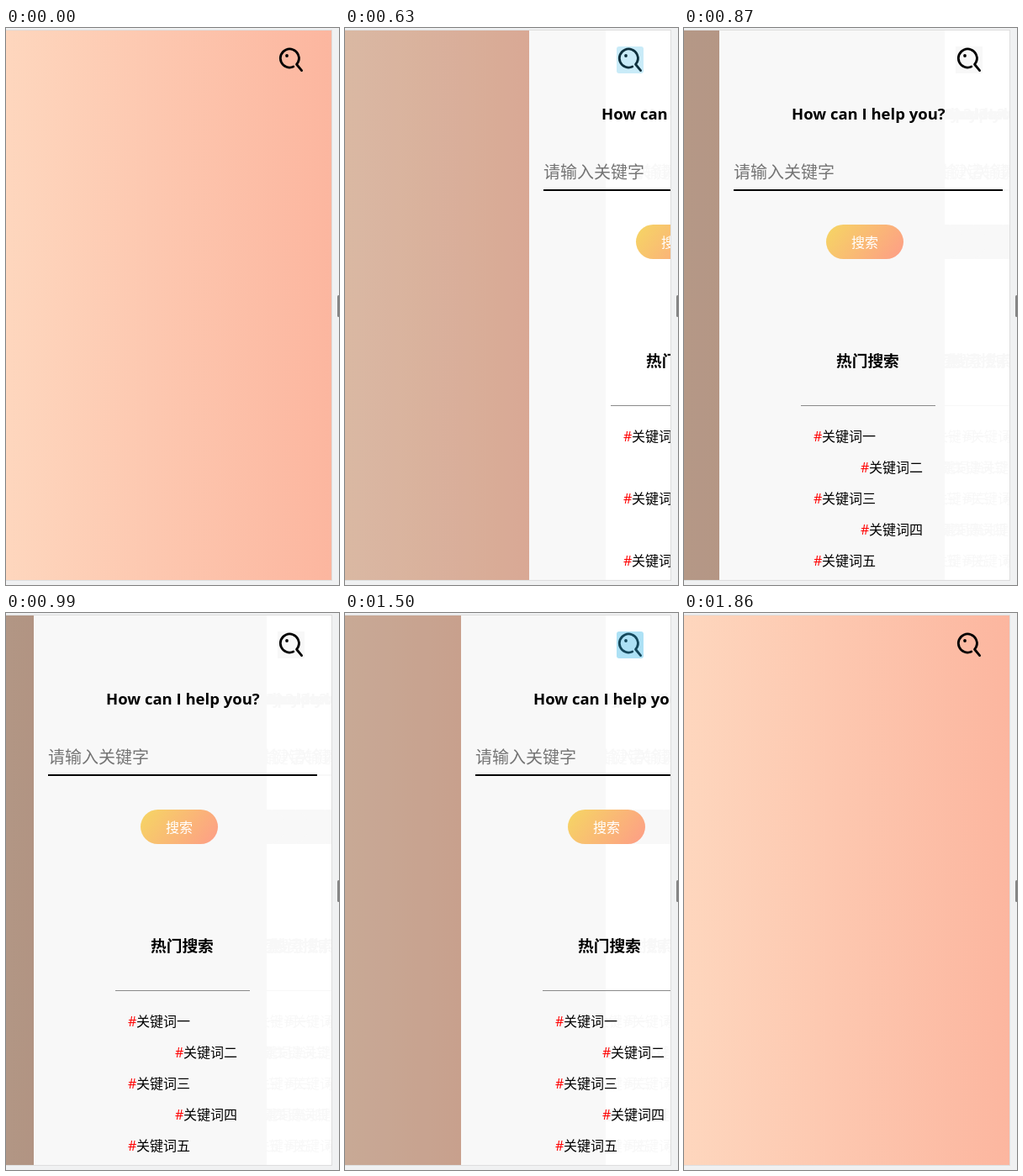
Write an HTML page with a canvas that moves like this. It is 396 px wide and 663 px high and loops after 2.19 s.

```html
<!DOCTYPE html>
<html lang="zh-CN">
<head>
<meta charset="utf-8">
<title>Search drawer</title>
<style>
  html, body { margin: 0; width: 100%; height: 100%; overflow: hidden; background: #f0f1f2; }
  canvas { display: block; width: 396px; height: 663px; }
</style>
</head>
<body>
<canvas id="stage" width="396" height="663"></canvas>
<script>
const ctx = document.getElementById('stage').getContext('2d');
const LOOP = 2190, STEP = 30, OPEN = 510, CLOSE = 1410, CLOSED = 1860;
const PAGE = { top: 3, right: 387, bottom: 657 };
const DRAWER = 354, TINT = '#f8f8f8', WHITE_FROM = 310;
const CJK = '"Noto Sans CJK SC", "Noto Sans CJK", sans-serif';
const KEYWORDS = ['关键词一', '关键词二', '关键词三', '关键词四', '关键词五'];

const clamp = v => Math.min(1, Math.max(0, v));

// CSS "ease": cubic-bezier(.25, .1, .25, 1)
function ease(x) {
  x = clamp(x);
  let lo = 0, hi = 1;
  for (let i = 0; i < 24; i++) {
    const s = (lo + hi) / 2;
    if (0.75 * s * (1 - s) + s ** 3 < x) lo = s; else hi = s;
  }
  const s = hi, r = 1 - s;
  return 0.3 * s * r * r + 3 * r * s * s + s ** 3;
}

function openness(t) {
  if (t < OPEN || t >= CLOSED) return 0;
  return t < CLOSE ? ease((t - 498) / 469) : 1 - ease((t - 1398) / 510);
}

const drawerX = t => Math.round(PAGE.right - DRAWER * openness(t));

function rect(x, y, w, h, fill) {
  ctx.fillStyle = fill;
  ctx.fillRect(x, y, w, h);
}

function pill(x, y, w, h, r, fill) {
  ctx.fillStyle = fill;
  ctx.beginPath();
  ctx.roundRect(x, y, w, h, r);
  ctx.fill();
}

function text(str, x, y, font, fill) {
  ctx.font = font;
  ctx.fillStyle = fill;
  ctx.fillText(str, x, y);
}

function clipTo(x, y, w, h) {
  ctx.beginPath();
  ctx.rect(x, y, w, h);
  ctx.clip();
}

// With a ghost colour, everything is drawn flat in that colour.
function drawContent(x, ghost) {
  const ink = color => ghost || color;
  ctx.save();
  ctx.translate(x, 0);
  text('How can I help you?', 86, 109, 'bold 18.5px "Open Sans", sans-serif', ink('#000'));
  text('请输入关键字', 17, 178.5, '20px ' + CJK, ink('#757575'));
  rect(17, 192, 320, 2, ink('#000'));

  const gold = ctx.createLinearGradient(139, 228, 207, 281);
  gold.addColorStop(0, '#f6d365');
  gold.addColorStop(1, '#fda085');
  pill(127, 234, 92, 41, 20.5, ink(gold));
  text('搜索', 157, 261, '16px ' + CJK, ink('#fff'));

  text('热门搜索', 139, 402.5, 'bold 18.72px ' + CJK, ink('#000'));
  rect(97, 449, 160, 1, ink('#8a8a8a'));
  KEYWORDS.forEach((word, i) => {
    const left = i % 2 ? 168 : 112, base = 492 + i * 37;
    text('#', left, base, '16px "Open Sans", sans-serif', ink('#f00'));
    text(word, left + 10, base, '16px ' + CJK, ink('#000'));
  });
  ctx.restore();
}

function drawDrawer(t, x) {
  const height = PAGE.bottom - PAGE.top;
  rect(x, PAGE.top, PAGE.right - x, height, TINT);
  const whiteX = Math.max(WHITE_FROM, x);
  rect(whiteX, PAGE.top, PAGE.right - whiteX, height, '#fff');

  // Moving content leaves a faint trail on the white part.
  ctx.save();
  clipTo(whiteX, PAGE.top, PAGE.right - whiteX, height);
  for (let past = OPEN; past < t; past += STEP) {
    if (past < 1020 || past >= CLOSE) drawContent(drawerX(past), TINT);
  }
  if (t > OPEN + 180 && t < CLOSE) rect(323, 22, 32, 32, TINT);
  ctx.restore();

  ctx.save();
  clipTo(x, PAGE.top, PAGE.right - x, height);
  drawContent(x);
  ctx.restore();
}

function drawIcon() {
  ctx.strokeStyle = ctx.fillStyle = '#000';
  ctx.lineWidth = 2.8;
  ctx.lineCap = ctx.lineJoin = 'round';
  ctx.beginPath();
  ctx.arc(337.3, 36, 11, 1.15, 0.72 + Math.PI * 2);
  ctx.lineTo(351.6, 50.6);
  ctx.stroke();
  ctx.beginPath();
  ctx.arc(334, 33, 1.9, 0, Math.PI * 2);
  ctx.fill();
}

function drawTap(t) {
  const age = t - (t < CLOSE ? OPEN : CLOSE);
  if (age < 0) return;
  const alpha = 0.4 * (1 - clamp((age - 90) / 90));
  if (alpha) pill(323, 22, 32, 32, 3, `rgba(51,181,229,${alpha})`);
}

function draw(t) {
  rect(0, 0, 396, 663, '#f0f1f2');
  rect(0, 2, 388, 656, '#dedede');
  const peach = ctx.createLinearGradient(-258, 0, 387, 0);
  peach.addColorStop(0, '#ffecd2');
  peach.addColorStop(1, '#fcb69f');
  const height = PAGE.bottom - PAGE.top;
  rect(0, PAGE.top, PAGE.right, height, peach);

  const open = openness(t);
  if (open > 0) {
    rect(0, PAGE.top, PAGE.right, height, `rgba(0,0,0,${0.3 * open})`);
    drawDrawer(t, drawerX(t));
  }
  drawIcon();
  drawTap(t);
  pill(394, 318, 4, 26, 1.5, '#858585');
}

let shown = -1;
function tick() {
  const t = Math.floor((performance.now() % LOOP) / STEP) * STEP;
  if (t !== shown) draw(shown = t);
  requestAnimationFrame(tick);
}
tick();
</script>
</body>
</html>
```
